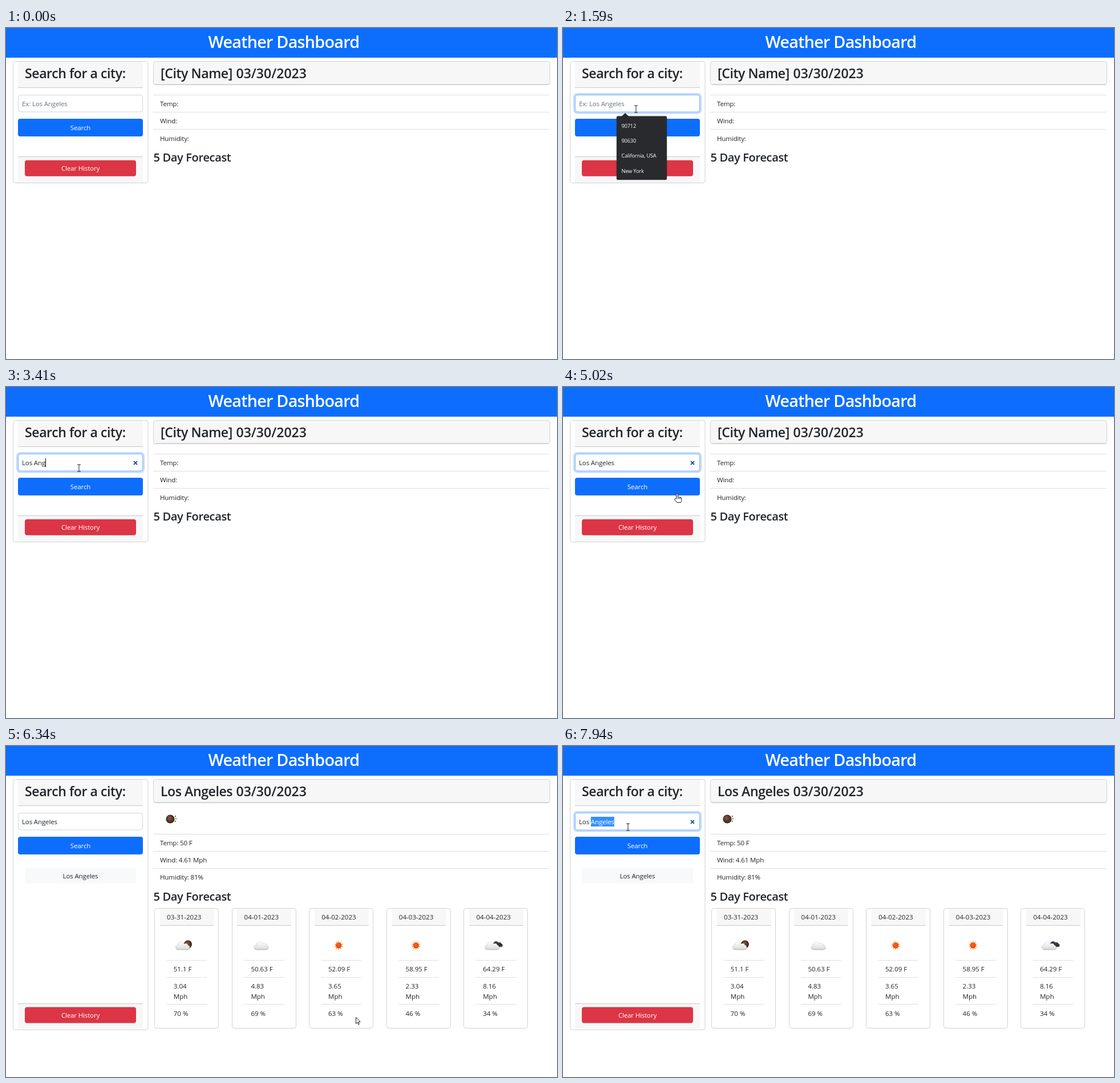
These frames come from a looping animation (966x580 px, 8 s). An HTML page with a canvas:

```html
<!DOCTYPE html>
<html lang="en">
<head>
<meta charset="utf-8">
<title>Weather Dashboard</title>
<style>
html, body { margin: 0; width: 100%; height: 100%; overflow: hidden; background: #fff; }
canvas { display: block; width: 966px; height: 580px; }
</style>
</head>
<body>
<canvas id="stage" width="966" height="580"></canvas>
<script>
const ctx = document.getElementById('stage').getContext('2d');
const LOOP = 8000, STEP = 70;
const BODY = 11.6, TIGHT = -0.016;
const INK = '#212529', CAP = '#f7f7f7', EDGE = '#d2d2d2', RULE = '#dfdfdf', LINE = '#c9c9c9';

const CITY = 'Los Angeles';
const FOCUS = 1060, TYPE = 1920, KEY_GAP = 216, BLUR = 5200, HISTORY = 5230;
const RESULTS = 5850, REFOCUS = 7600, SELECT = 7800, BLINK = 530;

// Each move bends past a point on its way to the next resting place.
const ENTRY = { x: 966, y: 580 };
const MOVES = [
  { start: 250, end: 870, bend: { x: 200, y: 190 }, to: { x: 128, y: 142 } },
  { start: 4610, end: 4750, bend: { x: 220, y: 146 }, to: { x: 281, y: 153 } },
  { start: 4950, end: 5160, bend: { x: 250, y: 200 }, to: { x: 158, y: 182 } },
  { start: 5290, end: 5710, bend: { x: 300, y: 262 }, to: { x: 434, y: 344 } },
  { start: 5780, end: 6550, bend: { x: 690, y: 742 }, to: { x: 604, y: 440 } },
  { start: 6620, end: 7390, bend: { x: 230, y: 210 }, to: { x: 118, y: 160 } },
  { start: 7460, end: 7600, bend: { x: 116, y: 152 }, to: { x: 114, y: 142 } }
];

// Temperature, wind, humidity, sky
const FORECAST = ['51.1 3.04 70 night', '50.63 4.83 69 cloud', '52.09 3.65 63 sun',
  '58.95 2.33 46 sun', '64.29 8.16 34 overcast'];

const INPUT = [21, 117, 219, 30.5];
const SEARCH = [21, 159, 219, 31];
const RECENT = [33, 213.5, 195, 27.5];

const grown = t => t >= RESULTS ? 225.8 : t >= HISTORY ? 33.8 : 0;
const clearBox = t => [33, 231.8 + grown(t), 195, 28];
const clamp = v => Math.max(0, Math.min(1, v));
const ramp = (t, start, span) => clamp((t - start) / span);
const inside = (p, [x, y, w, h]) => !!p && p.x >= x && p.x < x + w && p.y >= y && p.y < y + h;
const mix = (a, b, k) => `rgb(${a.map((v, i) => Math.round(v + (b[i] - v) * k))})`;
const bezier = (a, b, c, u) => (1 - u) ** 2 * a + 2 * u * (1 - u) * b + u * u * c;

function pointerAt(t) {
  const i = MOVES.findLastIndex(m => m.start <= t);
  if (i < 0) return null;
  const { start, end, bend, to } = MOVES[i];
  const from = i ? MOVES[i - 1].to : ENTRY;
  const steps = Math.round((end - start) / STEP) + 1;
  const done = clamp((Math.floor((t - start) / STEP + 0.1) + 1) / steps);
  const u = 1 - (1 - done) ** 2;
  return { x: bezier(from.x, bend.x, to.x, u), y: bezier(from.y, bend.y, to.y, u) };
}

// Button colour eases in and out over two steps.
const hover = (t, area) => [1, 2].filter(n => inside(pointerAt(t - n * STEP), area)).length / 2;

function text(str, x, cy, { size = BODY, weight = 400, gap = TIGHT, color = INK, align = 'left' } = {}) {
  ctx.font = `${weight} ${size}px "Open Sans", "Noto Sans", sans-serif`;
  ctx.letterSpacing = `${gap * size}px`;
  ctx.textAlign = align;
  ctx.fillStyle = color;
  ctx.fillText(str, x, cy + size * 0.357);
  return ctx.measureText(str).width;
}

function heading(str, x, cy, size, more) {
  text(str, x, cy, { size, weight: 600, gap: -0.019, ...more });
}

function box(x, y, w, h, fill, stroke, r = 4) {
  ctx.beginPath();
  ctx.roundRect(x, y, w, h, r);
  if (fill) { ctx.fillStyle = fill; ctx.fill(); }
  if (stroke) { ctx.strokeStyle = stroke; ctx.lineWidth = 1; ctx.stroke(); }
}

function rect(x, y, w, h, fill) {
  ctx.fillStyle = fill;
  ctx.fillRect(x, y, w, h);
}

function button(label, [x, y, w, h], fill, color) {
  box(x, y, w, h, fill);
  text(label, x + w / 2, y + h / 2 + 0.5, { color, align: 'center' });
}

function disc(x, y, r, fill) {
  ctx.beginPath();
  ctx.arc(x, y, r, 0, 7);
  ctx.fillStyle = fill;
  ctx.fill();
}

function glow(x, y, r, inner, outer) {
  const g = ctx.createRadialGradient(x - r / 4, y - r / 3, 1, x, y, r);
  g.addColorStop(0, inner);
  g.addColorStop(1, outer);
  disc(x, y, r, g);
}

function poly(points) {
  ctx.beginPath();
  points.forEach(([x, y]) => ctx.lineTo(x, y));
  ctx.closePath();
}

const moon = (x, y, r) => glow(x, y, r, '#80563f', '#3d2318');

function cloud(x, y, top, low, scale = 1) {
  ctx.save();
  ctx.translate(x, y);
  ctx.scale(scale, scale);
  const g = ctx.createLinearGradient(0, -7, 0, 6);
  g.addColorStop(0, top);
  g.addColorStop(1, low);
  ctx.beginPath();
  ctx.roundRect(-12, -1, 24, 7, 3.5);
  ctx.moveTo(2.5, -1);
  ctx.arc(-3, -1, 5.5, 0, 7);
  ctx.moveTo(9, 0);
  ctx.arc(5, 0, 4, 0, 7);
  ctx.fillStyle = g;
  ctx.shadowColor = 'rgba(0,0,0,.55)';
  ctx.shadowBlur = 2;
  ctx.shadowOffsetY = 0.5;
  ctx.fill();
  ctx.restore();
}

function sun(x, y) {
  const rays = Array.from({ length: 20 }, (_, i) => {
    const r = i % 2 ? 4.5 : 8.5, a = i * Math.PI / 10;
    return [x + r * Math.sin(a), y - r * Math.cos(a)];
  });
  poly(rays);
  ctx.fillStyle = '#f29a2e';
  ctx.fill();
  glow(x, y, 4.8, '#f4611c', '#e8431a');
}

function icon(kind, x, y) {
  if (kind === 'sun') return sun(x, y + 1);
  if (kind === 'night') moon(x + 7, y - 1, 7);
  if (kind === 'overcast') cloud(x + 7, y - 1.5, '#4a4254', '#292330', 0.75);
  cloud(kind === 'cloud' ? x : x - 2, y + 1.5, '#ffffff', '#dcdcdc');
}

function sidebar(t) {
  const grow = grown(t);
  box(12.5, 58.5, 236.5, 213 + grow, '#fff', EDGE);
  rect(21, 59, 219, 45, CAP);
  rect(21, 104, 219, 1, LINE);
  heading('Search for a city:', 33, 80, 23.1);
  field(t);
  button('Search', SEARCH, mix([13, 110, 253], [11, 94, 215], hover(t, SEARCH)), '#fff');
  if (t >= HISTORY) button(CITY, RECENT, mix([248, 249, 250], [211, 212, 213], hover(t, RECENT)), INK);
  const y = Math.round(225 + grow);
  rect(21, y, 219, 1, LINE);
  rect(21, y + 1, 219, 45, CAP);
  button('Clear History', clearBox(t), '#dc3545', '#fff');
}

function field(t) {
  const [x, y, w, h] = INPUT;
  const focus = ramp(t, FOCUS, 150) - ramp(t, BLUR, 150) + ramp(t, REFOCUS, 150);
  const active = (t >= FOCUS && t < BLUR) || t >= REFOCUS;
  if (focus > 0) box(x - 3, y - 3, w + 6, h + 6, `rgba(13,110,253,${0.25 * focus})`, null, 7);
  box(x + 0.5, y + 0.5, w - 1, h - 1, '#fff', mix([206, 212, 218], [134, 183, 254], focus));

  const keys = Math.max(0, Math.min(CITY.length, Math.floor((t - TYPE) / KEY_GAP) + 1));
  const typed = CITY.slice(0, keys);
  let width = 0;
  if (typed) width = text(typed, 28, 132.5);
  else text('Ex: ' + CITY, 28, 132.5, { color: '#6c757d' });

  if (t >= SELECT) {
    const start = 28 + ctx.measureText('Los ').width;
    rect(start, 124, 28 + width - start, 17, '#3390ff');
    text('Angeles', start, 132.5, { color: '#fff' });
  } else if (active) {
    const last = t >= REFOCUS ? REFOCUS : keys ? TYPE + (keys - 1) * KEY_GAP : FOCUS;
    if (Math.floor((t - last) / BLINK) % 2 === 0) rect(Math.round(28 + width), 125, 1, 15, '#000');
  }

  if (typed && (active || inside(pointerAt(t), INPUT))) {
    ctx.beginPath();
    ctx.moveTo(224, 130); ctx.lineTo(230, 136);
    ctx.moveTo(230, 130); ctx.lineTo(224, 136);
    ctx.strokeStyle = '#2257a0';
    ctx.lineWidth = 1.9;
    ctx.stroke();
  }
}

function suggestions(t) {
  const alpha = ramp(t, FOCUS + 40, 150) - ramp(t, TYPE + 20, 190);
  if (alpha <= 0) return;
  ctx.save();
  ctx.globalAlpha = alpha;
  ctx.shadowColor = 'rgba(0,0,0,.3)';
  ctx.shadowBlur = 3;
  box(94, 154.5, 88, 111.5, '#292a2d', null, 2);
  ctx.shadowColor = 'transparent';
  poly([[102.5, 155], [109, 149], [115.5, 155]]);
  ctx.fill();
  ['90712', '90630', 'California, USA', 'New York'].forEach((s, i) =>
    text(s, 102.5, 171.3 + i * 26.4, { size: 9.2, color: '#fff' }));
  ctx.restore();
}

function report(t) {
  const ready = t >= RESULTS;
  const drop = ready ? 36.7 : 0;
  box(258.5, 58.5, 695, 41, CAP, EDGE);
  rect(261, 98.5, 690, 1, '#c4c4c4');
  heading(ready ? CITY : '[City Name]', 271, 80, 23.1);
  heading('03/30/2023', 403.5, 80, 23.1, { gap: 0 });

  const values = ready ? [' 50 F', ' 4.61 Mph', ' 81%'] : ['', '', ''];
  ['Temp:', 'Wind:', 'Humidity:'].forEach((label, i) => {
    const y = 117.2 + drop + i * 30.1;
    rect(258, Math.round(y), 695, 1, RULE);
    text(label + values[i], 270, y + 16);
  });
  heading('5 Day Forecast', 258.5, 227 + drop, 20.1);
  if (!ready) return;
  moon(288, 128, 7.6);
  for (let a = -0.5; a <= 0.5; a += 0.5) disc(288 + 10 * Math.cos(a), 127.5 + 9 * Math.sin(a), 1.1, '#6a4a3a');
  FORECAST.forEach(dayCard);
}

function dayCard(row, i) {
  const [temp, wind, humid, sky] = row.split(' ');
  const day = new Date(2023, 2, 31 + i);
  const two = n => String(n).padStart(2, '0');
  const x = 260.5 + i * 135.6;
  box(Math.floor(x) + 0.5, 284.5, 112, 210, '#fff', EDGE);
  rect(x + 9, 285, 95, 29, CAP);
  rect(x + 9, 314, 95, 1, LINE);
  text(`${two(day.getMonth() + 1)}-${two(day.getDate())}-2023`, x + 21.5, 300, { gap: 0 });
  icon(sky, x + 51.5, 348.5);

  let y = 375;
  for (const lines of [[temp + ' F'], [wind, 'Mph'], [humid + ' %']]) {
    rect(x + 21, Math.floor(y), 70.5, 1, RULE);
    lines.forEach((s, n) => text(s, x + 33.3, y + 16 + n * 17.5, { gap: -0.005 }));
    y += 12.5 + lines.length * 17.5;
  }
}

function ibeam() {
  ctx.beginPath();
  ctx.moveTo(-3, -6); ctx.lineTo(3, -6);
  ctx.moveTo(0, -6); ctx.lineTo(0, 6);
  ctx.moveTo(-3, 6); ctx.lineTo(3, 6);
  ctx.stroke();
}

function hand() {
  const shape = new Path2D('M-1.3 9V1Q-1.2-.3 0-.3T1.3 1V6Q2.5 4.8 3.6 6.2 4.9 5.2 5.8 6.8 7.6 6.3 7.8 8V11.5Q7.6 13.5 6.5 15.5H0L-4.2 10.5Q-4.8 9-3.2 8.4Z');
  ctx.fill(shape);
  ctx.stroke(shape);
  ctx.beginPath();
  for (let x = 1.3; x < 6; x += 2.25) {
    ctx.moveTo(x, 6.5);
    ctx.lineTo(x, 9);
  }
  ctx.stroke();
}

function arrow() {
  poly([[0.5, 0.5], [0.5, 11.5], [3, 9.2], [4.8, 13], [6.4, 12.3], [4.7, 8.6], [8.2, 8.2]]);
  ctx.fill();
  ctx.stroke();
}

function pointer(t) {
  const p = pointerAt(t);
  if (!p) return;
  const links = [SEARCH, clearBox(t)];
  if (t >= HISTORY) links.push(RECENT);
  ctx.save();
  ctx.translate(Math.round(p.x), Math.round(p.y));
  ctx.lineJoin = 'round';
  ctx.lineWidth = 1;
  ctx.strokeStyle = '#222';
  ctx.fillStyle = '#fff';
  if (inside(p, INPUT)) ibeam();
  else if (links.some(area => inside(p, area))) hand();
  else arrow();
  ctx.restore();
}

function draw(now) {
  const t = now % LOOP;
  rect(0, 0, 966, 580, '#fff');
  rect(0, 0, 966, 52, '#0d6efd');
  heading('Weather Dashboard', 487, 24.6, 28.8, { color: '#fff', align: 'center', gap: -0.027 });
  sidebar(t);
  report(t);
  suggestions(t);
  pointer(t);
  requestAnimationFrame(draw);
}
requestAnimationFrame(draw);
</script>
</body>
</html>
```
